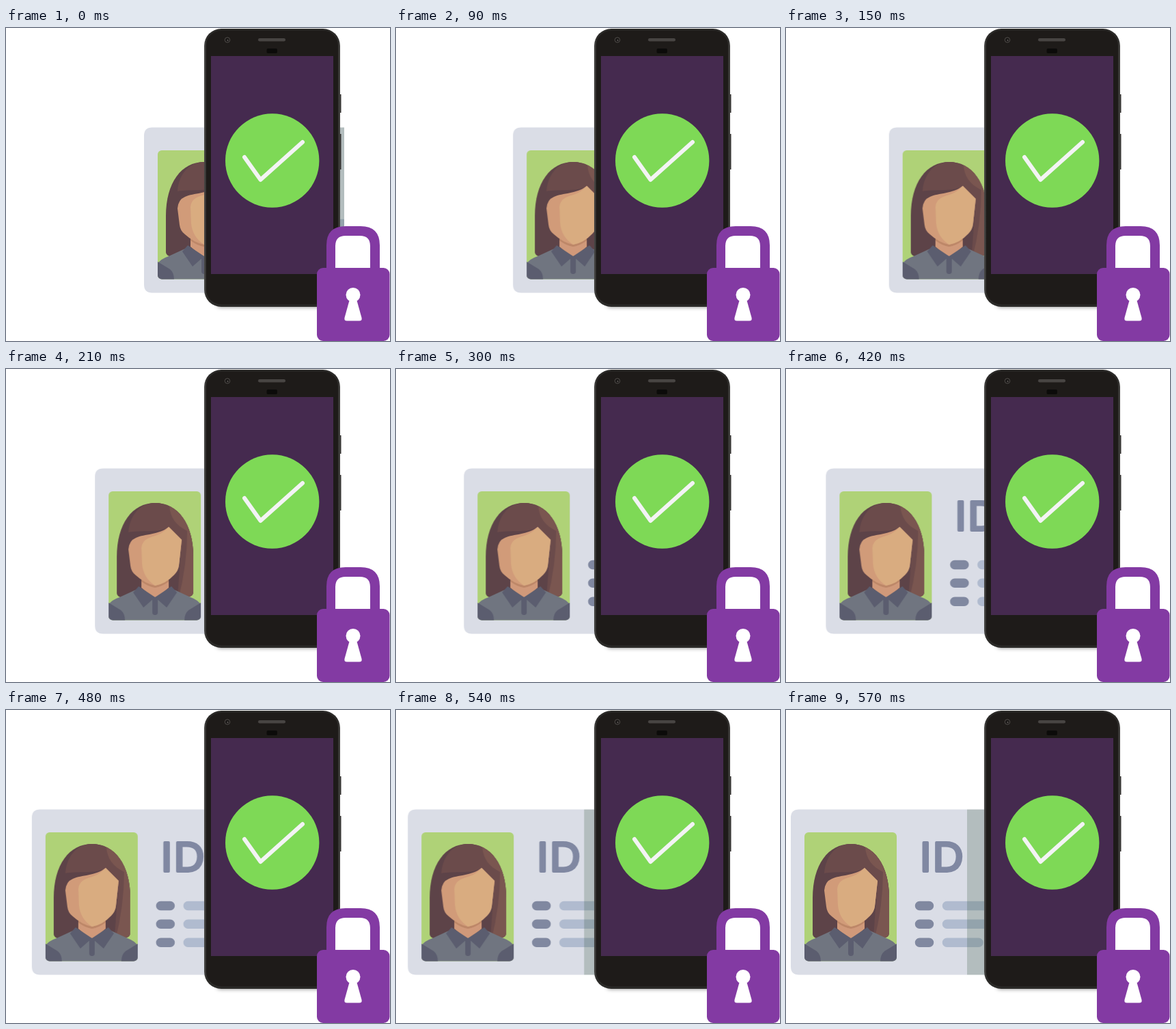
An HTML page that plays this animation: 562x458 px, repeating every 1.34 s.

```html
<!DOCTYPE html>
<html lang="en">
<head>
<meta charset="utf-8">
<title>ID check</title>
<style>
  html, body { margin: 0; width: 100%; height: 100%; overflow: hidden; background: #fff; }
  svg { display: block; width: 562px; height: 458px; }
  .card { animation: slide 1340ms infinite; }
  /* 19 jumps of 30 ms, then a rest */
  @keyframes slide {
    0% { transform: translateX(195px); animation-timing-function: steps(19, end); }
    42.5373%, 100% { transform: translateX(0); }
  }
  .id {
    font: 61.3px "Liberation Sans", Arial, sans-serif;
    letter-spacing: 2.2px;
    fill: #8088a2;
    stroke: #8088a2;
    stroke-width: 3.8px;
    stroke-linejoin: round;
  }
</style>
</head>
<body>
<svg viewBox="0 0 562 458">
  <defs>
    <clipPath id="cardShape"><path d="M19 145.500H300V387.500H19Q7 387.500 7 375.500V157.500Q7 145.500 19 145.500Z"/></clipPath>
    <clipPath id="photoShape"><rect x="27" y="179" width="135" height="188.500" rx="6"/></clipPath>
    <clipPath id="hairShape"><path id="hair" d="M39 328V275C39 226 62 196 95 196S151 226 151 275V326Q151 331 146 333L127 338H64L47 335Q39 333 39 328Z"/></clipPath>
    <filter id="blur" x="-20%" y="-200%" width="140%" height="500%"><feGaussianBlur stdDeviation="3"/></filter>
    <linearGradient id="rim" x2="1" y2="0">
      <stop stop-color="#4b4a48"/>
      <stop offset=".02" stop-color="#2b2a28"/>
      <stop offset=".98" stop-color="#2b2a28"/>
      <stop offset="1" stop-color="#454442"/>
    </linearGradient>
  </defs>

  <g class="card">
    <g clip-path="url(#cardShape)">
      <path fill="#dadde6" d="M7 145H300V388H7Z"/>

      <g clip-path="url(#photoShape)">
        <path fill="#afd277" d="M27 179H162V368H27Z"/>
        <use href="#hair" fill="#5d4348"/>
        <g clip-path="url(#hairShape)">
          <path fill="#6b4b4b" d="M56 239C57 218 70 196 95 196L160 196V345H127L134 250L115 231C100 241 75 235 56 239Z"/>
          <path fill="#7a5650" d="M116 200C117 218 126 229 142 237Q142 290 127 345H160V196Z"/>
        </g>
        <path fill="#d0997a" d="M75 300H115V320L95 337L75 320Z"/>
        <path fill="#bd8768" d="M75 307L95 317L115 307V311Q104 319 95 320Q86 319 75 311Z"/>
        <path fill="#d19b79" d="M115 231L134 250L130 287Q129 295 123 301Q111 314 95 317Q80 314 67 302Q60 297 59 288L56 264Q57 251 67 247C80 241 100 243 115 231Z"/>
        <path fill="#d9ac80" d="M115 231L134 250L130 287Q129 295 123 301Q111 314 95 317Q78 306 76 286L75 262Q76 250 89 246C100 243 108 239 115 231Z"/>

        <path fill="#707580" d="M27 368V345Q31 338 43 334L69 322L95 334L121 322L147 334Q158 338 162 345V368Z"/>
        <path id="shoulder" fill="#5b5d6f" d="M27 342L45 353Q51 358 51 368H27Z"/>
        <use href="#shoulder" transform="matrix(-1 0 0 1 189 0)"/>
        <path id="collar" fill="#5b5d6f" d="M71 318L63 327L78 349L95 334Z"/>
        <use href="#collar" transform="matrix(-1 0 0 1 190 0)"/>
        <path fill="#5b5d6f" d="M91 334H99V356Q99 360 95 360T91 356Z"/>
      </g>

      <text class="id" x="195.700" y="235.600">ID</text>
      <g fill="none" stroke-width="13.500" stroke-linecap="round">
        <path stroke="#8088a0" d="M195.500 286.500H209.500M195.500 313.300H209.500M195.500 340.200H209.500"/>
        <path stroke="#b0bbcf" d="M235.500 286.500H310M235.500 313.300H310M235.500 340.200H282"/>
      </g>
      <path fill="rgb(62 93 70 / .25)" d="M265 145H300V388H265Z"/>
    </g>
  </g>

  <g class="phone">
    <path fill="#000" opacity=".5" filter="url(#blur)" d="M310 400H470V408H310Z"/>
    <path fill="#363533" d="M486 97H490.500V124H486ZM486 155H490.500V207H486Z"/>
    <rect x="290" y="1" width="199" height="407" rx="25" fill="url(#rim)"/>
    <rect x="293" y="3.500" width="193" height="401" rx="22" fill="#1e1b19"/>
    <path fill="#452a4f" d="M300 41H479V360H300Z"/>
    <rect x="369" y="15" width="40" height="4.500" rx="2.200" fill="#484543"/>
    <rect x="381.500" y="30" width="15.500" height="7" rx="2" fill="#0c0b0a"/>
    <circle cx="324" cy="17.500" r="3.700" fill="#171514" stroke="#55514e"/>
    <circle cx="324.500" cy="18" r="1.200" fill="#55514e"/>
    <circle cx="389.700" cy="194" r="68.700" fill="#7ed956"/>
    <path fill="none" stroke="#f3f3f4" stroke-width="6" stroke-linecap="round" stroke-linejoin="round" d="M349 189L372.500 222L434 167"/>
  </g>

  <g class="lock" fill="#833aa3">
    <path fill="#fff" d="M480 352V316Q480 302 494 302H521Q535 302 535 316V352Z"/>
    <path d="M469 354V318Q469 290 497 290H519Q547 290 547 318V354H533V319Q533 304 518 304H497Q482 304 482 319V354Z"/>
    <rect x="455" y="351" width="106.500" height="107" rx="9"/>
    <g fill="#fff">
      <circle cx="508" cy="390.500" r="10.500"/>
      <path d="M503 397H513L520.500 424Q521.500 428.500 517 428.500H499Q494.500 428.500 495.500 424Z"/>
    </g>
  </g>
</svg>
</body>
</html>
```
